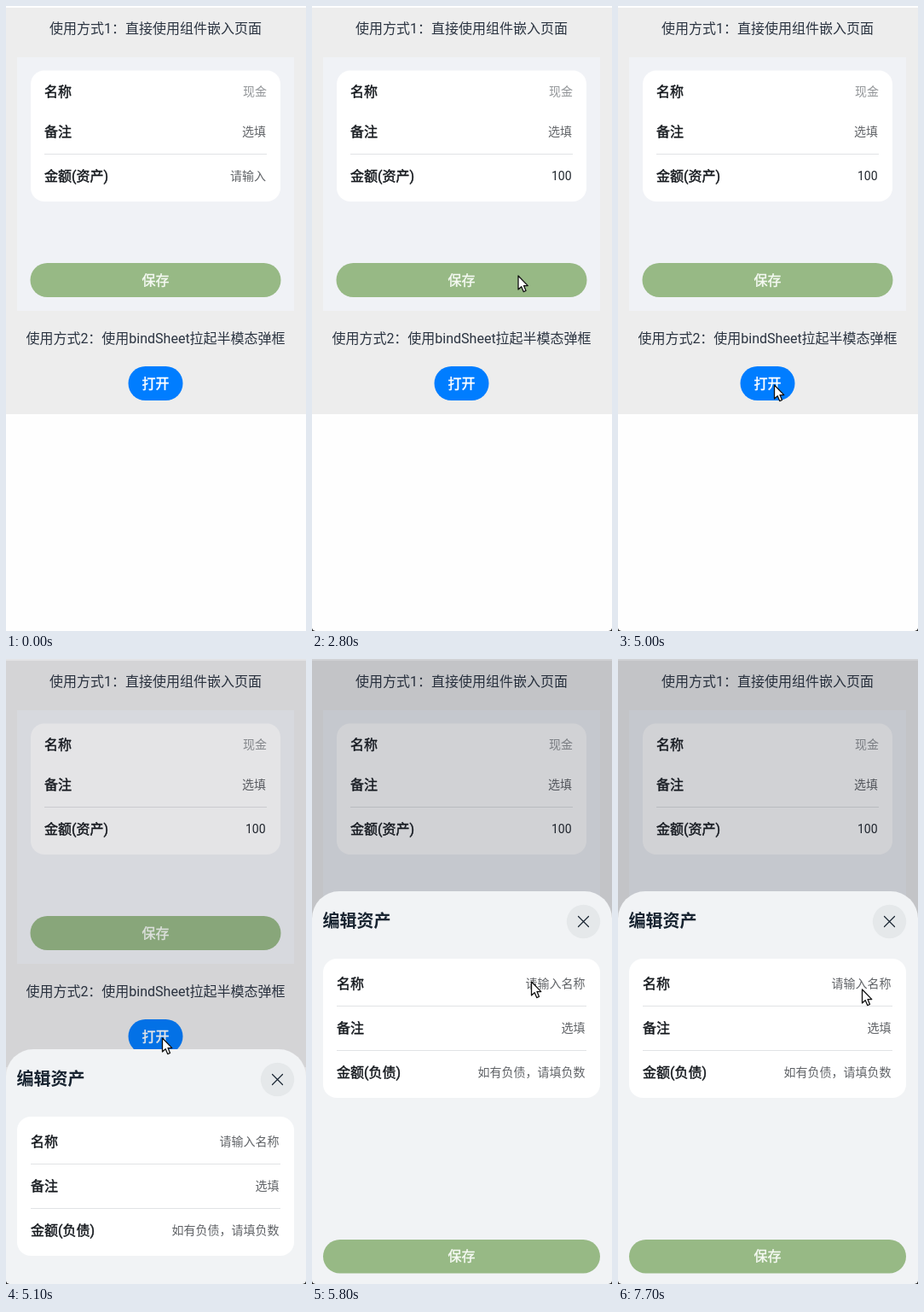
An HTML page that plays this animation: 352x732 px, repeating every 8 s.

```html
<!DOCTYPE html>
<html lang="zh-CN">
<head>
<meta charset="utf-8">
<title>资产表单</title>
<style>
  html, body { margin: 0; width: 100%; height: 100%; overflow: hidden; background: #fefefe; }
  svg { display: block; width: 352px; height: 732px; }
  text { font-family: Roboto, "Noto Sans CJK SC", "Noto Sans CJK", sans-serif; white-space: pre; }
  .medium { stroke: currentColor; stroke-width: .45px; }
</style>
</head>
<body>
<svg id="stage" viewBox="0 0 352 732" xmlns="http://www.w3.org/2000/svg"></svg>
<script>
const LOOP = 8000, STEP = 100;
const INK = '#182431', LABEL = '#14181d', HINT = '#606367', GREEN = '#97b985', BLUE = '#007dff';

const rect = (x, y, w, h, fill, r = 0, extra = '') =>
  `<rect x="${x}" y="${y}" width="${w}" height="${h}" rx="${r}" fill="${fill}" ${extra}/>`;

// Text is placed by its vertical centre.
const text = (str, x, cy, { size = 16, fill = INK, anchor = 'middle', weight = 400, medium, id = '' } = {}) =>
  `<text x="${x}" y="${cy + size * 0.35}" font-size="${size}" fill="${fill}" color="${fill}"
    text-anchor="${anchor}" font-weight="${weight}" ${medium ? 'class="medium"' : ''} ${id && `id="${id}"`}>${str}</text>`;

const label = (str, x, cy) => text(str, x, cy, { fill: LABEL, anchor: 'start', medium: true });
const value = (str, x, cy, fill = HINT, id = '') => text(str, x, cy, { size: 14, fill, anchor: 'end', id });
const divider = (x, y, w) => rect(x, y, w, 1, '#e1e3e5');

const page = [
  rect(0, 0, 352, 732, '#fefefe'),
  rect(0, 2, 352, 476, '#ededed'),
  text('使用方式1：直接使用组件嵌入页面', 175.5, 26.5, { fill: '#2b3441' }),
  rect(13, 60, 325, 297, '#f0f2f6'),
  rect(29, 75.5, 293, 153.5, '#fff', 16),
  label('名称', 45, 100.5), value('现金', 306, 100.5, '#929598'),
  label('备注', 45, 147.5), value('选填', 305, 147.5),
  divider(45, 173, 261),
  label('金额(资产)', 45, 199.5), value('请输入', 305, 199.5, HINT, 'amount'),
  rect(303, 191, 2, 16.5, BLUE, 1, 'id="amountCaret"'),
  rect(28.5, 301, 294, 40, GREEN, 20, 'id="save"'),
  text('保存', 175.5, 321, { fill: '#f6faf4', medium: true }),
  text('使用方式2：使用bindSheet拉起半模态弹框', 175.5, 389.5, { fill: '#2b3441' }),
  rect(143.5, 422, 64, 40, BLUE, 20, 'id="open"'),
  text('打开', 175.5, 442.3, { fill: '#fff', medium: true }),
].join('');

const toast = `<g id="toast">
  ${rect(126, 592.5, 99, 36, '#fff', 18, 'filter="url(#soft)"')}
  ${text('保存成功~', 175.5, 610, { size: 14, fill: '#20262d' })}</g>`;

const sheet = `<g id="sheet">
  ${rect(0, 0, 352, 800, '#f1f3f5', 32)}
  ${text('编辑资产', 12.5, 35, { size: 20, anchor: 'start', weight: 700 })}
  <circle cx="318.5" cy="35.5" r="19.7" fill="#e5e8ea"/>
  <path d="M312.5 29.5l12 12m0-12l-12 12" stroke="${INK}" stroke-width="1.2" stroke-linecap="round"/>
  ${rect(13, 79, 325, 163, '#fff', 16)}
  ${label('名称', 29, 108.5)}${value('请输入名称', 320.5, 108.5)}
  ${divider(29, 134, 293)}
  ${label('备注', 29, 160.5)}${value('选填', 320.5, 160.5)}
  ${divider(29, 186, 293)}
  ${label('金额(负债)', 29, 212.5)}${value('如有负债，请填负数', 320.5, 212.5)}
  ${rect(13, 408, 325, 39.5, GREEN, 19.75)}
  ${text('保存', 175.5, 427.5, { fill: '#f6faf4', medium: true })}
  ${rect(319, 100, 2, 18, BLUE, 1, 'id="nameCaret"')}</g>`;

const stage = document.getElementById('stage');
stage.innerHTML = `
  <defs><filter id="soft" x="-50%" y="-120%" width="200%" height="360%">
    <feDropShadow dx="0" dy="5" stdDeviation="10" flood-color="#000" flood-opacity=".22"/></filter></defs>
  ${page}${toast}${rect(0, 0, 352, 732, '#1c2030', 0, 'id="mask"')}${sheet}
  <path id="corners" d="M0 728.5Q.5 731.5 4 732H0ZM352 728.5Q351.5 731.5 348 732H352Z" fill="#222"/>
  <path id="cursor" d="M0 0V16L3.7 12.7L6.3 18.7L9 17.5L6.5 11.6H11.3Z"
    fill="#fff" stroke="#111" stroke-width="1.3" stroke-linejoin="round"/>`;

const ui = {};
stage.querySelectorAll('[id]').forEach(el => ui[el.id] = el);

// [time, x, y] of the pointer tip
const route = [
  [200, 292, 33], [300, 292, 108], [400, 292, 172], [500, 292, 197], [1000, 292, 197],
  [1200, 287.5, 204], [2500, 287.5, 204], [2800, 242, 316], [3200, 242, 316], [3700, 232, 358],
  [3900, 223.5, 384], [4400, 183.5, 444], [5400, 183.5, 444], [5800, 257.5, 378], [5900, 289, 346],
  [6200, 318, 318], [6300, 318, 318], [6900, 286.5, 387], [LOOP, 286.5, 387],
];

const clamp = v => Math.min(1, Math.max(0, v));
const ramp = (t, from, to) => clamp((t - from) / (to - from));
const within = (t, from, to) => t >= from && t < to;
const show = (el, on) => el.setAttribute('visibility', on ? 'visible' : 'hidden');

function pointerAt(t) {
  const i = Math.max(1, route.findIndex(p => p[0] > t));
  const [t0, x0, y0] = route[i - 1], [t1, x1, y1] = route[i];
  const k = ramp(t, t0, t1);
  return [x0 + (x1 - x0) * k, y0 + (y1 - y0) * k];
}

// Critically damped spring: the share of the way still to go.
function springLeft(ms) {
  const s = 0.0175 * Math.max(0, ms);
  return (1 + s) * Math.exp(-s);
}

function draw(t) {
  const typed = t < 1600 ? '' : t < 1800 ? '1' : t < 2000 ? '10' : '100';
  ui.amount.textContent = typed || '请输入';
  ui.amount.setAttribute('fill', typed ? '#20262d' : HINT);
  ui.amount.setAttribute('x', typed ? 304.5 : 305);
  show(ui.amountCaret, within(t, 1200, 2700));
  show(ui.nameCaret, within(t, 7200, 7700));
  show(ui.corners, t >= 1100);

  ui.save.setAttribute('fill', within(t, 3100, 3300) ? '#88a778' : GREEN);
  ui.open.setAttribute('fill', within(t, 4800, 5000) ? '#0071e6' : BLUE);
  ui.toast.setAttribute('opacity', ramp(t, 3200, 3500) * (1 - ramp(t, 4700, 5000)));

  const left = t < 5100 ? 1 : springLeft(t - 4985);
  ui.sheet.setAttribute('transform', `translate(0 ${Math.round(272 + 460 * left)})`);
  ui.mask.setAttribute('opacity', 0.2 * (1 - left));

  show(ui.cursor, t >= 200);
  const [x, y] = pointerAt(t);
  ui.cursor.setAttribute('transform', `translate(${x} ${y})`);
}

const start = performance.now();
function tick() {
  const t = (performance.now() - start) % LOOP;
  draw(Math.floor(t / STEP) * STEP);
  requestAnimationFrame(tick);
}
tick();
</script>
</body>
</html>
```
